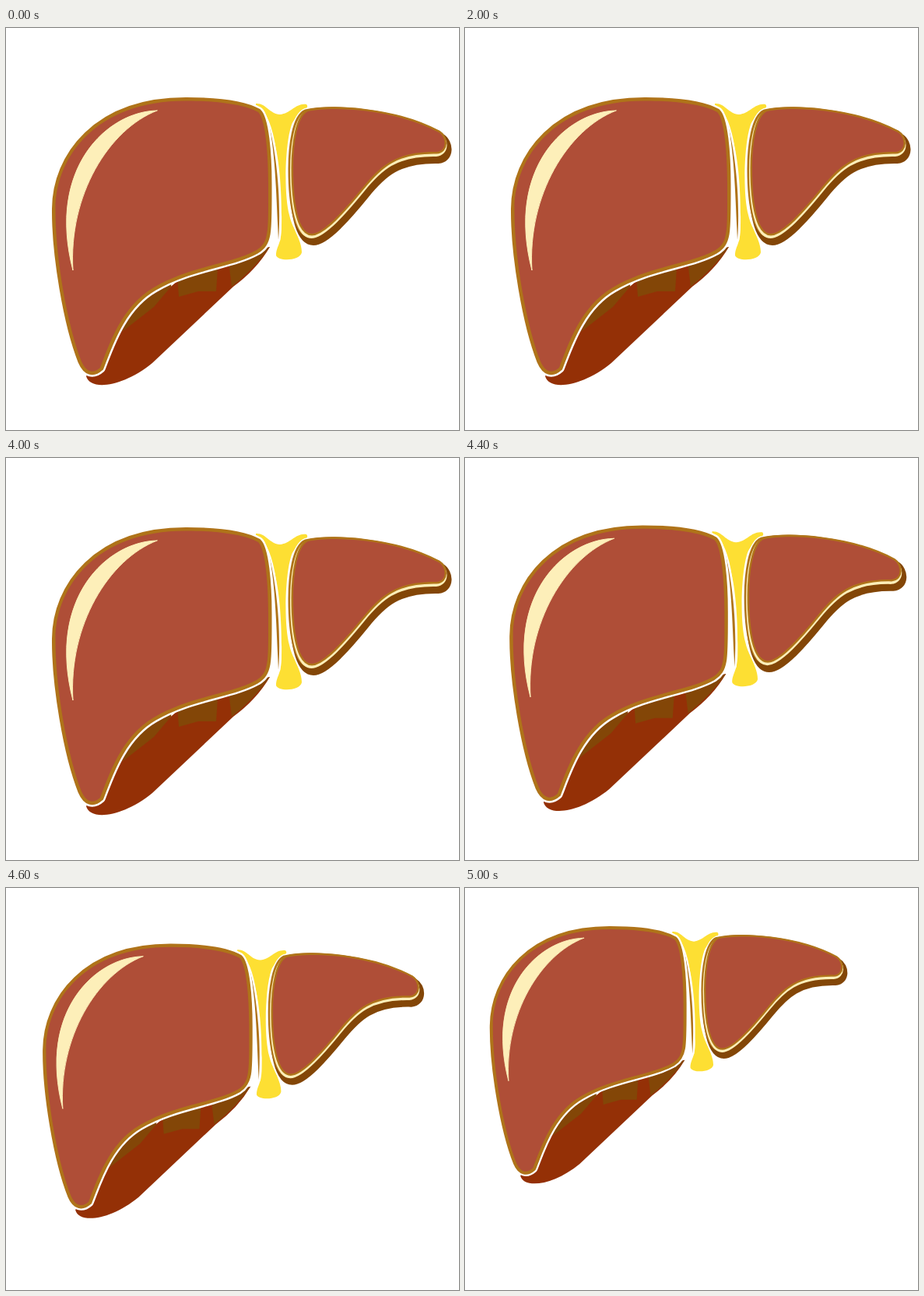
Recreate the animation shown at these times as an HTML page. Size 582 px wide and 516 px high, loop 5100 ms.

```html
<!DOCTYPE html>
<html lang="en">
<head>
<meta charset="utf-8">
<title>Liver</title>
<style>
  html, body { margin: 0; width: 100%; height: 100%; overflow: hidden; background: #fff; }
  svg { display: block; }
  .gold { fill: #af7319; stroke: #af7319; }
  .brick { fill: #af4e37; }
  .cream { fill: #fdefb9; stroke: #fdefb9; }
  .yellow { fill: #fddf33; }
  .dark { fill: #834607; stroke: #834607; }
  .rust { fill: #943006; }
  .white { fill: #fff; stroke: #fff; }
  .gap { fill: none; stroke: #fff; }
</style>
</head>
<body>
<svg width="582" height="516" viewBox="0 0 582 516" stroke-width="0" stroke-linejoin="round" stroke-linecap="round">
  <defs>
    <path id="large" d="M63.5 232C64 165 116 93 232 93.5C280 93.5 310 100 324 108
      C333 116 337 160 337 200C337 262 338 275 322 285C290 303 235 306 190 333
      C148 357 132 408 121 436C112 444 103 442 97 428C78 380 63 290 63.5 232Z"/>
    <path id="small" d="M388 107C420 100 500 104 556 134C566 140 567 158 553 159
      C500 158 480 178 458 205S408 264 393 264C376 264 369 225 369 180C369 150 374 113 388 107Z"/>
  </defs>
  <g id="liver">
    <!-- Underside of the large lobe -->
    <path class="rust" d="M103 447C108 466 150 461 188 430L292 332Q322 310 339 281L250 300L130 400Z"/>
    <g class="dark">
      <path d="M339 281Q320 308 290 332L286 300Z"/>
      <path d="M220 318L272 308L270 338L247 338L222 345Z"/>
      <path d="M149 390L166 350L213 320L212 332L190 358Z"/>
    </g>

    <!-- Ligament -->
    <path class="yellow" d="M321 97C334 96 338 110 352 111C366 110 372 96 386 98
      C392 104 374 108 367 124C358 150 357 215 364 240C368 258 380 272 380 288
      C378 299 350 300 347 292C347 280 354 278 354 255C355 200 350 120 321 103Z"/>
    <path class="gap" stroke-width="7" d="M325 105C348 130 348 200 349 271"/>
    <path class="gold" d="M334 112C346 145 347 210 350 272C354 220 347 150 334 112Z"/>

    <!-- Each lobe is one outline, layered with wider rims underneath -->
    <use href="#large" class="white" stroke-width="14"/>
    <use href="#large" class="gold" stroke-width="9"/>
    <use href="#large" class="brick"/>
    <path class="cream" stroke-width="1" d="M194 106C130 107 52 180 86 311C80 215 132 130 194 106Z"/>

    <use href="#small" class="white" stroke-width="10" x="-3" y="1"/>
    <use href="#small" class="dark" stroke-width="14" x="2" y="8"/>
    <use href="#small" class="gold" stroke-width="7" x="-3" y="1"/>
    <use href="#small" class="cream" stroke-width="7" x="-.5" y="2.5"/>
    <use href="#small" class="gold" stroke-width="5"/>
    <use href="#small" class="brick"/>
  </g>
</svg>
<script>
const liver = document.getElementById('liver');
const LOOP = 5100, STEP = 100;
const START = 4365, SLOWDOWN = 4600;   // shrinking begins, then eases off
const FAST = .000195, SLOW = .000148;  // scale lost per millisecond
const CENTER = [-200, -292];           // the point the organ shrinks towards

function scaleAt(time) {
  const fast = Math.max(0, Math.min(time, SLOWDOWN) - START);
  const slow = Math.max(0, time - SLOWDOWN);
  return 1 - fast * FAST - slow * SLOW;
}

function frame() {
  const time = Math.floor(performance.now() % LOOP / STEP) * STEP;
  const scale = scaleAt(time);
  const [x, y] = CENTER.map(v => v * (1 - scale));
  liver.setAttribute('transform', `translate(${x} ${y}) scale(${scale})`);
  requestAnimationFrame(frame);
}
frame();
</script>
</body>
</html>
```
